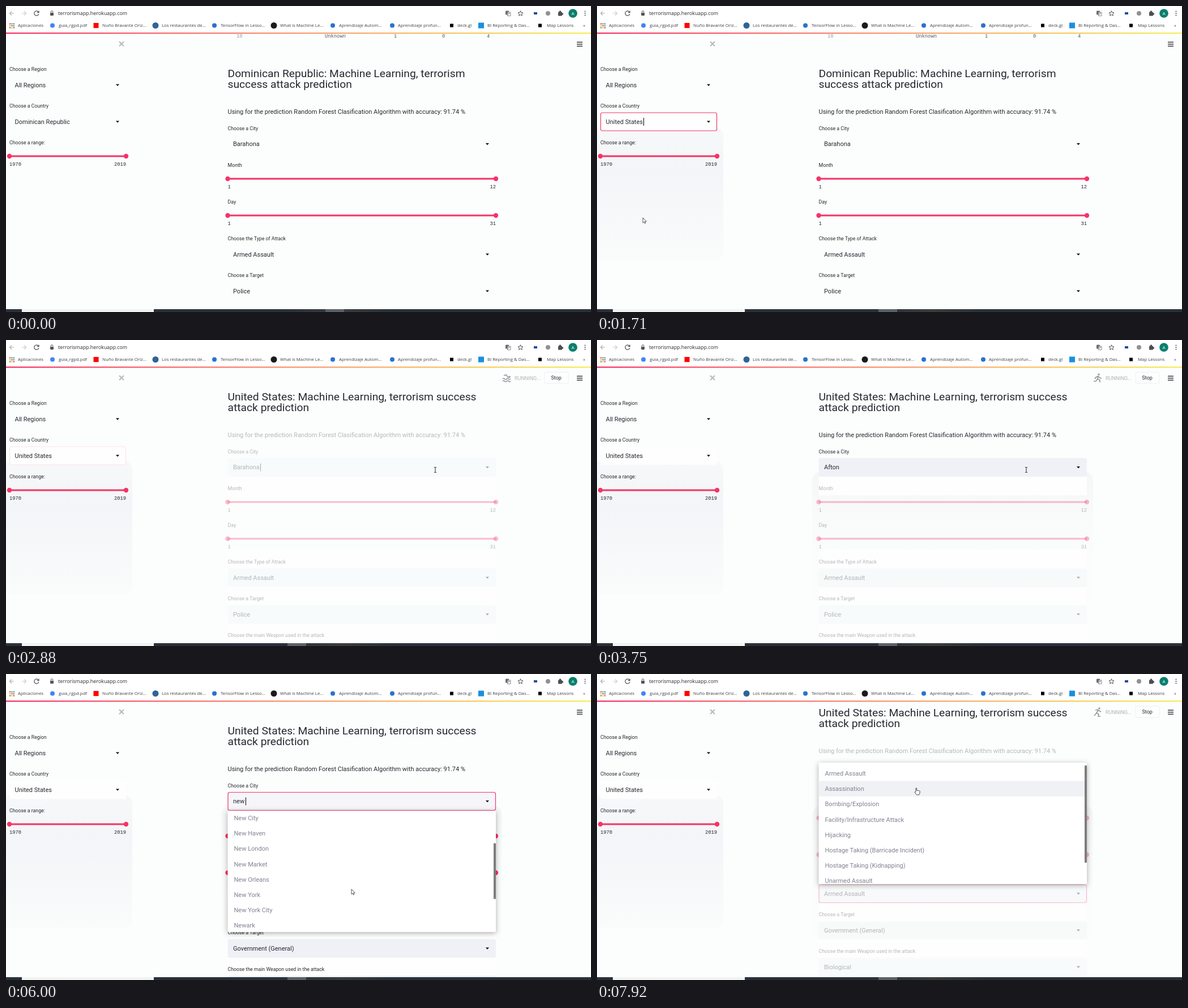
Recreate the animation shown at these times as an HTML page with a canvas. Size 1033 by 542 pixels, loop 8000 ms.

```html
<!DOCTYPE html>
<html lang="es">
<head>
<meta charset="utf-8">
<style>
html, body { margin: 0; width: 100%; height: 100%; overflow: hidden; background: #fcfefd; }
canvas { display: block; }
</style>
</head>
<body>
<canvas id="stage" width="1033" height="542"></canvas>
<script>
const c = document.getElementById('stage').getContext('2d');
const SANS = 'Roboto, sans-serif', UI = '"Open Sans", sans-serif', MONO = '"Liberation Mono", monospace';
const PINK = '#f63366', INK = '#262730', PAGE = '#fcfefd', ROW = 27.2, LIST_H = 215;

const COUNTRIES = ['Afghanistan', 'Albania', 'Algeria', 'Angola', 'Argentina', 'Australia', 'Austria', 'Belgium', 'Bolivia',
  'Brazil', 'Canada', 'Chile', 'Colombia', 'Dominican Republic', 'Ecuador', 'Egypt', 'France', 'Tunisia', 'Turkey',
  'Uganda', 'Ukraine', 'United Kingdom', 'United States', 'Uruguay', 'Venezuela', 'Yemen'];
const OLD_CITIES = ['Barahona', 'Bonao', 'Nagua', 'Navarrete', 'Salcedo', 'Santiago', 'Santo Domingo', 'Unknown'];
const CITIES = ['Afton', 'Akron', 'Albany', 'Albuquerque', 'Alexandria', 'Anchorage', 'Ann Arbor', 'Atlanta', 'Austin',
  'Baltimore', 'Berkeley', 'Boston', 'Boulder', 'Buffalo', 'Chicago', 'Cleveland', 'Dallas', 'Denver', 'Detroit', 'Houston'];
const NEW_CITIES = ['Kennewick', 'New Bedford', 'New Brunswick', 'New Castle', 'New City', 'New Haven', 'New London',
  'New Market', 'New Orleans', 'New York', 'New York City', 'Newark', 'Newburgh', 'Newport', 'Newport News', 'Newton'];
const ATTACKS = ['Armed Assault', 'Assassination', 'Bombing/Explosion', 'Facility/Infrastructure Attack', 'Hijacking',
  'Hostage Taking (Barricade Incident)', 'Hostage Taking (Kidnapping)', 'Unarmed Assault', 'Unknown'];

// label, text x, icon x, icon colour, icon radius, round icon
const BOOKMARKS = [
  ['Aplicaciones', 21], ['guia_rgpd.pdf', 93, 82, '#4285f4', 4, 1], ['Nuño Bravante Oriz...', 170, 159, '#f00', 4.5],
  ['Los restaurantes de...', 275, 264, '#2f6596', 5.5, 1], ['TensorFlow in Lesso...', 379, 368, '#2a73cc', 4, 1],
  ['What is Machine Le...', 484, 473, '#1b1b1b', 5.5, 1], ['Aprendizaje Autom...', 588, 577, '#2a73cc', 4, 1],
  ['Aprendizaje profun...', 692, 682, '#2a73cc', 4, 1], ['deck.gl', 797, 787, '#000', 3],
  ['BI Reporting & Das...', 850, 839, '#1a8fe0', 5], ['Map Lessons', 955, 943, '#000', 3], ['»', 1019]];

const PATH = [[120, 560, 536], [400, 275, 352], [520, 266, 240], [640, 205, 203], [930, 205, 203], [1250, 81, 375],
  [1850, 81, 375], [2520, 758, 230], [5250, 758, 230], [5650, 612, 370], [5950, 610, 381], [6200, 610, 381],
  [6820, 923, 398], [7080, 923, 398], [7450, 478, 389], [7710, 478, 389], [7900, 562, 202], [8000, 562, 202]];

// running, swimming, skating, standing: head x, head y, limbs
const FIGURES = [
  [886, 61, 'M885 64L881 66 879 69M885 64L884 69 888 71V75M884 69L881 73H877M885 64L888 67 891 68'],
  [889, 65.5, 'M879 63L883 61.5 887 66.5M877 69q2-2 3.5 0t3.5 0 3.5 0 3.5 0M877 73q2-2 3.5 0t3.5 0 3.5 0 3.5 0'],
  [887, 61, 'M885 63L880 64M885 64L882 69 886 71 885 75H889M885 64L890 67M882 69L878 74'],
  [884, 60.5, 'M878 63.5L882 65H886L890 63.5M882.5 65V75M885.5 65V75M884 65V70']];

const ease = k => (k = Math.min(1, Math.max(0, k)), k * k * (3 - 2 * k));
let t = 0;
const within = (a, b) => t >= a && t < b;

function text(s, x, cy, size = 11, color = INK, family = SANS, align = 'left') {
  c.font = `${size}px ${family}`;
  c.fillStyle = color;
  c.textAlign = align;
  c.fillText(s, x, Math.round(cy + size * .355));
}
function rect(x, y, w, h, color, r = 0) {
  c.fillStyle = color;
  c.beginPath();
  c.roundRect(x, y, w, h, r);
  c.fill();
}
function dot(x, y, r, color) {
  c.fillStyle = color;
  c.beginPath();
  c.arc(x, y, r, 0, 7);
  c.fill();
}
function stroke(d, color, width = 1) {
  c.strokeStyle = color;
  c.lineWidth = width;
  c.stroke(new Path2D(d));
}
function gradient(x0, y0, x1, y1, ...stops) {
  const g = c.createLinearGradient(x0, y0, x1, y1);
  stops.forEach((s, i) => g.addColorStop(i / (stops.length - 1), s));
  return g;
}
function withAlpha(a, draw) {
  c.globalAlpha = a;
  draw();
  c.globalAlpha = 1;
}

function slider(x, y, w, from, to) {
  rect(x, y - 1.5, w, 3, PINK);
  dot(x, y, 4.2, PINK);
  dot(x + w, y, 4.2, PINK);
  text(from, x, y + 14, 8.8, INK, MONO);
  text(to, x + w, y + 14, 8.8, INK, MONO, 'right');
}
function select(label, value, x, y, w, { fill, border = 0, caret } = {}) {
  text(label, x, y - 28, 8.75);
  if (fill) rect(x, y - 16.5, w, 33, fill, 3);
  if (border) {
    const a = c.globalAlpha;
    c.globalAlpha = a * border;
    c.strokeStyle = PINK;
    c.lineWidth = 1.2;
    c.beginPath();
    c.roundRect(x + .5, y - 16, w - 1, 32, 3);
    c.stroke();
    c.globalAlpha = a;
  }
  text(value, x + 9.5, y);
  if (caret) rect(Math.round(x + 11 + c.measureText(value).width), y - 7, 1, 14, '#000');
  c.fillStyle = '#000';
  c.fill(new Path2D(`M${x + w - 18} ${y - 1.5}h6l-3 3.2z`));
}
function list(items, x, y, w, scroll = 0, hover = -1) {
  c.save();
  c.shadowColor = 'rgba(0,0,0,.32)';
  c.shadowBlur = 10;
  c.shadowOffsetY = 2;
  rect(x, y, w, LIST_H, '#fff', 2);
  c.restore();
  c.save();
  c.beginPath();
  c.rect(x, y, w, LIST_H);
  c.clip();
  items.forEach((item, i) => {
    const cy = y + 19 + ROW * i - scroll;
    if (i === hover) rect(x, cy - ROW / 2, w, ROW, '#f0f1f5');
    text(item, x + 11, cy, 11, '#808292');
  });
  const content = items.length * ROW + 11, track = LIST_H - 10;
  if (content > LIST_H)
    rect(x + w - 4, y + 5 + track * scroll / content, 4, track * LIST_H / content, '#7d7d7d', 1);
  c.restore();
}

function browserBar() {
  rect(0, 0, 1033, 47, '#fff');
  stroke('M14 13H6.5M10 9.5L6.5 13 10 16.5', '#a9abae', 1.1);
  stroke('M28 13H35.5M32 9.5L35.5 13 32 16.5', '#c9cbce', 1.1);
  stroke('M57.2 10.6A4.1 4.1 0 1 0 57.8 14.2M58 8.6V11.6H55', '#4b4e52', 1.2);
  rect(78, 12, 6, 5, '#505357', 1);
  stroke('M79.2 12V10.4a1.8 1.8 0 0 1 3.6 0V12', '#505357');
  text('terrorismapp.herokuapp.com', 92, 13, 8.85, '#27292c', UI);

  rect(882, 8.5, 6, 7, '#6b6e72', 1);
  rect(885.5, 11, 5.5, 6.5, '#fff', 1);
  stroke('M885.5 11h5.5v6.5h-5.5zM886.5 13h3.5M888.2 12.5q0 2-1.7 3.5', '#6b6e72', .8);
  stroke('M908.5 8.6l1.3 3 3.2.3-2.4 2.1.7 3.2-2.8-1.7-2.8 1.7.7-3.2-2.4-2.1 3.2-.3z', '#4b4e52');
  rect(932, 11, 6, 4, '#1c4e9c');
  dot(957, 13, 4, '#8f9193');
  rect(975, 10.5, 7, 7, '#4b4e52', 1);
  dot(978.5, 10, 1.7, '#4b4e52');
  dot(982.5, 14, 1.7, '#4b4e52');
  dot(1001, 13, 7.8, '#087f6c');
  text('A', 1001, 13, 8, '#fff', UI, 'center');
  for (const y of [9.5, 13, 16.5]) dot(1022.5, y, 1, '#4b4e52');

  const apps = ['#ea4335', '#4285f4', '#34a853', '#fbbc05'];
  for (let i = 0; i < 9; i++) rect(6 + i % 3 * 3.4, 30.5 + Math.floor(i / 3) * 3.4, 2.2, 2.2, apps[i % 4]);
  for (const [label, x, ix, color, r, round] of BOOKMARKS) {
    if (ix) rect(ix - r, 34.5 - r, 2 * r, 2 * r, color, round ? r : 0);
    text(label, x, 34.5, 7.8, '#3c3f43', UI);
  }
  rect(0, 47, 1033, 2.3, gradient(0, 0, 1033, 0, PINK, '#fa9873', '#f6ee58'));
}

function sidebar() {
  if (t >= 720) rect(-10, 215, 233, 235, gradient(0, 215, 0, 450, '#f7f8f9', '#f4f5f8', '#f7f8f9', '#fafbfb'), 14);
  stroke('M200 63l8 8M208 63l-8 8', '#b9bac3', 2.3);
  select('Choose a Region', 'All Regions', 6, 140, 206);
  const border = t < 660 ? 0 : t < 1800 ? 1 : Math.max(0, 1 - (t - 1800) / 1250);
  select('Choose a Country', t < 1650 ? 'Dominican Republic' : 'United States', 6, 205, 206,
    { fill: t >= 660 && '#fefefe', border, caret: within(660, 1800) && t % 1000 > 400 });
  text('Choose a range:', 6, 242, 8.75);
  slider(6, 266, 206, '1970', '2019');
}

// Blocks fade while the app reruns and turn solid once refreshed.
function opacity(refreshed, refreshedAgain = 9e3) {
  const fade = (start, span) => 1 - .67 * Math.min(1, Math.max(0, (t - start) / span));
  if (t < refreshed) return fade(1850, 600);
  return t < refreshedAgain ? fade(6350, 940) : 1;
}

function cityValue() {
  if (t < 3450) return 'Barahona';
  if (t < 4620) return 'Afton';
  if (t >= 6090) return 'New York';
  return 'new'.slice(0, t < 4800 ? 1 : t < 4950 ? 2 : 3);
}

function mainPanel() {
  const x = 391.5, w = 473.5, shift = t < 2400 ? 0 : t < 6800 ? -19 : t < 7500 ? -50 : -51;
  const fill = t >= 1800 && '#f0f1f6', rest = opacity(4050);
  if (t < 1860)
    [['10', 407], ['Unknown', 563], ['1', 685], ['0', 770], ['4', 849]].forEach(([s, tx], i) =>
      text(s, tx, 53, 8.8, i ? '#55565f' : '#999aa3', MONO));
  if (t >= 2940) rect(380, 233, 496, 237, gradient(0, 233, 0, 470, '#f5f6f7', '#f9fafa', '#fbfcfc', '#fbfdfc'), 16);

  c.save();
  c.translate(0, shift);
  if (fill) for (const y of [261, 391, 457, 522]) rect(x, y, w, 33, '#fefefe');
  withAlpha(opacity(2500, 7500), () => {
    const lines = t < 2500
      ? ['Dominican Republic: Machine Learning, terrorism', 'success attack prediction']
      : ['United States: Machine Learning, terrorism success', 'attack prediction'];
    lines.forEach((line, i) => text(line, x, 119 + 19 * i, 19.25));
  });
  withAlpha(opacity(3450), () => {
    text('Using for the prediction Random Forest Clasification Algorithm with accuracy: 91.74 %', x, 187.5);
    const typing = within(4290, 6090);
    select('Choose a City', cityValue(), x, 244.5, w, {
      fill: typing ? '#f6f6fa' : fill,
      border: within(2940, 3450) || within(4290, 7480) ? 1 : 0,
      caret: within(2800, 3400) || typing && !within(4470, 4620)
    });
  });
  withAlpha(rest, () => {
    text('Month', x, 281.5, 8.75);
    slider(x, 306, w, '1', '12');
    text('Day', x, 346.5, 8.75);
    slider(x, 371, w, '1', '31');
    select('Choose the Type of Attack', 'Armed Assault', x, 440, w, { fill, border: t >= 7500 ? 1 : 0 });
    select('Choose a Target', t < 4050 ? 'Police' : 'Government (General)', x, 505, w, { fill });
    select('Choose the main Weapon used in the attack', 'Biological', x, 570, w, { fill });
  });
  c.restore();

  if (within(1830, 4200) || t >= 6300) {
    const [hx, hy, limbs] = FIGURES[Math.floor(t / 300) % 4];
    dot(hx, hy, 1.8, '#97989f');
    stroke(limbs, '#97989f', 1.7);
    text('RUNNING...', 898, 68, 9, '#b1b2b9');
    rect(950.5, 56.5, 43, 21, '#eeeff2', 3);
    rect(951.5, 57.5, 41, 19, '#fdfefe', 2);
    text('Stop', 962.5, 67, 9);
  }
  for (const y of [64, 67.5, 71]) rect(1008, y - .6, 10, 1.4, INK);
}

function lists() {
  const x = 391.5, w = 473.5;
  if (within(720, 1650)) {
    const end = 19 + ROW * COUNTRIES.indexOf('United States') - 150;
    list(COUNTRIES, 6, 221.5, 206, end * ease((t - 960) / 560));
  }
  if (within(2940, 3450)) list(OLD_CITIES, x, 242, w);
  if (within(4290, 4800)) list(CITIES, x, 242, w);
  if (within(4800, 6090)) list(NEW_CITIES, x, 242, w, 114.8 * ease((t - 5250) / 640));
  if (t >= 7560) list(ATTACKS, x, 157, w, 0, 1);
}

function taskbar() {
  rect(0, 537, 1033, 5, '#29323a');
  rect(28, 537, 233, 5, '#f1f3f3');
  rect(500, 537, 180, 5, gradient(500, 0, 680, 0, '#29323a', '#3a3d3c', '#29323a'));
  rect(t < 500 ? 564 : 497, 537, 33, 5, '#596267');
  text('10:30', 968, 544, 7.5, '#c9cdd0', UI);
}

function cursor() {
  if (t < 120 || within(4620, 5250)) return;
  const i = Math.max(1, PATH.findIndex(p => p[0] > t)), [t0, x0, y0] = PATH[i - 1], [t1, x1, y1] = PATH[i];
  const k = ease((t - t0) / (t1 - t0));
  c.save();
  c.translate(x0 + (x1 - x0) * k, y0 + (y1 - y0) * k);
  const shape = (d, lineColor) => {
    c.fillStyle = '#fff';
    c.fill(new Path2D(d));
    stroke(d, lineColor, .9);
  };
  if (within(620, 960) || within(2450, 5400) || within(7420, 7740))
    stroke('M-2-4.5h1.5l.5.5.5-.5H2M0-4V4M-2 4.5h1.5L0 4l.5.5H2', '#222');
  else if (t >= 7740)
    shape('M1 0q1.2-.6 1.6.6V4l5 1q1 .4.7 2L7.5 10.5 6.5 12H2.5L-1 7.5q0-1.2 1.5-.5L1 7z', '#333');
  else
    shape('M0 0V9.2L2.1 7.3 3.5 10.3 4.8 9.7 3.5 6.8H6.3z', '#444');
  c.restore();
}

function frame() {
  t = performance.now() % 8000;
  rect(0, 0, 1033, 542, PAGE);
  sidebar();
  mainPanel();
  lists();
  browserBar();
  taskbar();
  cursor();
  requestAnimationFrame(frame);
}
frame();
</script>
</body>
</html>
```
